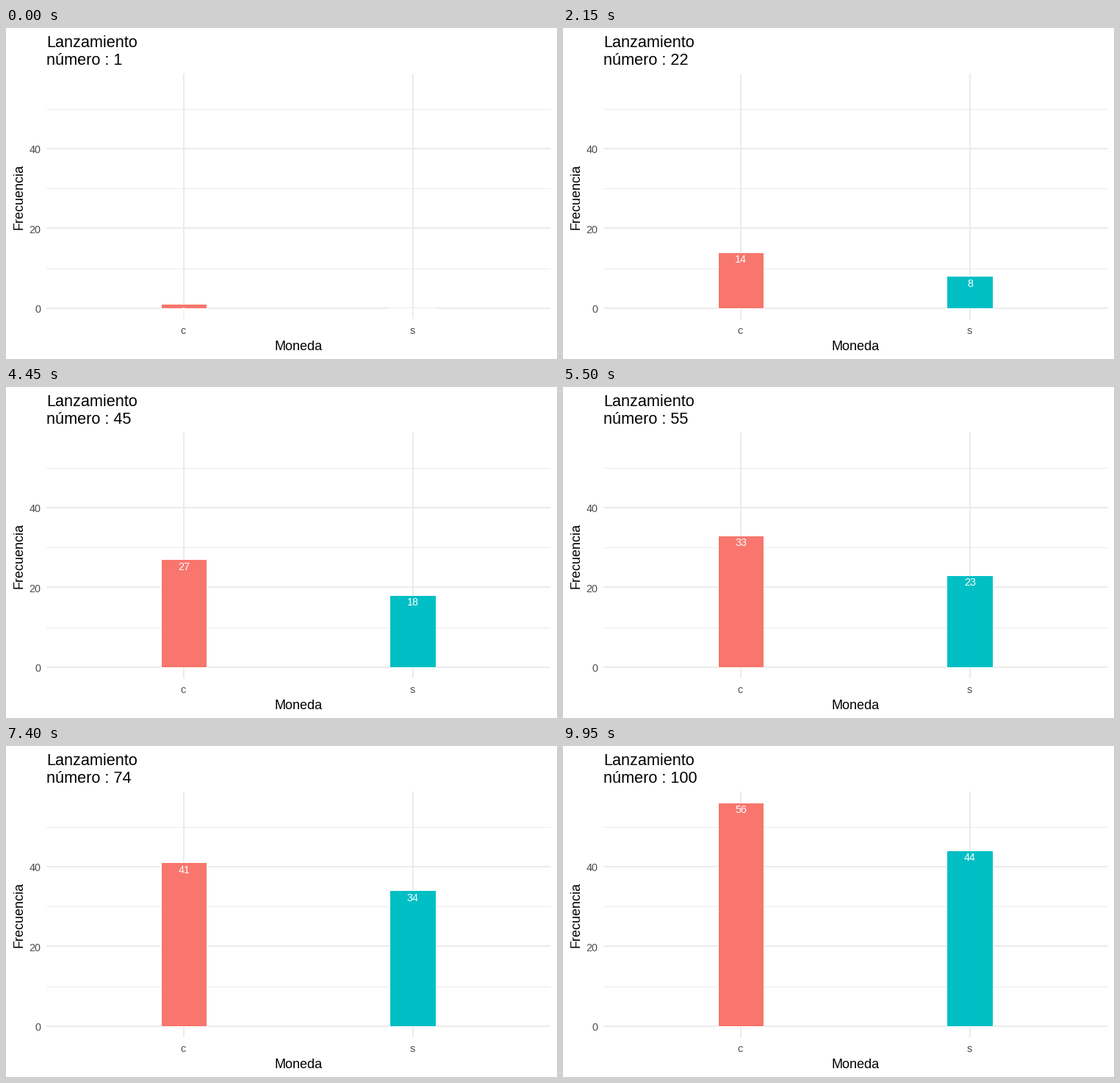
Recreate the animation shown at these times as a matplotlib script. Size 750 px wide and 450 px high, loop 10000 ms.

```python
import numpy as np
import matplotlib.pyplot as plt
from matplotlib.animation import FuncAnimation
from matplotlib.patches import Rectangle

W, H, DPI = 750, 450, 100
FRAMES, INTERVAL = 200, 50
LEFT, RIGHT, TOP, BOTTOM = 55, 741, 62, 396
BASE = 381
ZERO, UNIT = 380.8, 5.422
GRID, TICK = "#EBEBEB", "#4D4D4D"

plt.rcParams["font.family"] = "Liberation Sans"

# Running count of tails at a few tosses, filled in evenly between them
TOSSES = [1, 12, 22, 32, 33, 43, 45, 54, 64, 66, 75, 84, 85, 96, 100]
TAILS = [0, 4, 8, 10, 11, 17, 18, 22, 27, 29, 34, 38, 38, 42, 44]
tosses = np.arange(1, 101)
tails = np.floor(np.interp(tosses, TOSSES, TAILS) + 0.5).astype(int)
heads = tosses - tails

fig = plt.figure(figsize=(W / DPI, H / DPI), dpi=DPI, facecolor="white")
ax = fig.add_axes([0, 0, 1, 1])
ax.set_xlim(0, W)
ax.set_ylim(H, 0)
ax.axis("off")


def box(x, y, w, h, color, z=1):
    return ax.add_patch(Rectangle((x, y), w, h, facecolor=color, linewidth=0,
                                  antialiased=False, zorder=z))


def label(x, y, text, px, color="black", ha="center", z=5, **kw):
    return ax.text(x, y, text, fontsize=px * 72 / DPI, color=color, ha=ha,
                   va="baseline", zorder=z, **kw)


def y_of(value):
    return ZERO - UNIT * value


class Bar:
    def __init__(self, x, w, center, color):
        self.edge = box(x - 1, BASE, w + 2, 1, "white", 2)
        self.fill = box(x, BASE, w, 0, color, 3)
        self.text = label(center, BASE, "", 14.2, "white")

    def set(self, value):
        top = round(y_of(value))
        self.edge.set_y(top)
        self.edge.set_height(BASE + 1 - top)
        self.fill.set_y(top + 1)
        self.fill.set_height(max(BASE - top - 1, 0))
        self.text.set_text(str(value))
        self.text.set_y(y_of(value) + 14.2)


# Grid
for y in (110, 218, 327):
    box(LEFT, y, RIGHT - LEFT, 1, GRID)
for y in (163, 271, 380):
    box(LEFT, y, RIGHT - LEFT, 2, GRID)
for x in (241, 553):
    box(x, TOP, 2, BOTTOM - TOP, GRID)

# Axis text
for y, name in ((170, "40"), (279, "20"), (387, "0")):
    label(47, y, name, 14.4, TICK, "right")
for x, name in ((241.5, "c"), (553.5, "s")):
    label(x, 416, name, 14.4, TICK)
label(397.8, 438, "Moneda", 18)
label(23, 229, "Frecuencia", 18, rotation=90, rotation_mode="anchor")

label(LEFT, 26, "Lanzamiento", 21.6, ha="left")
title = label(LEFT, 50, "", 21.6, ha="left")
bars = (Bar(212, 61, 242.1, "#F8766D"), Bar(523, 62, 553.9, "#00BFC4"))


def update(frame):
    # The title steps half a toss behind the bars
    title.set_text(f"número : {max(1, (frame + 1) // 2)}")
    i = frame // 2
    for bar, counts in zip(bars, (heads, tails)):
        bar.set(int(counts[i]))
    return []


anim = FuncAnimation(fig, update, frames=FRAMES, interval=INTERVAL,
                     init_func=lambda: update(0), repeat=True, repeat_delay=0)
plt.show()
```
